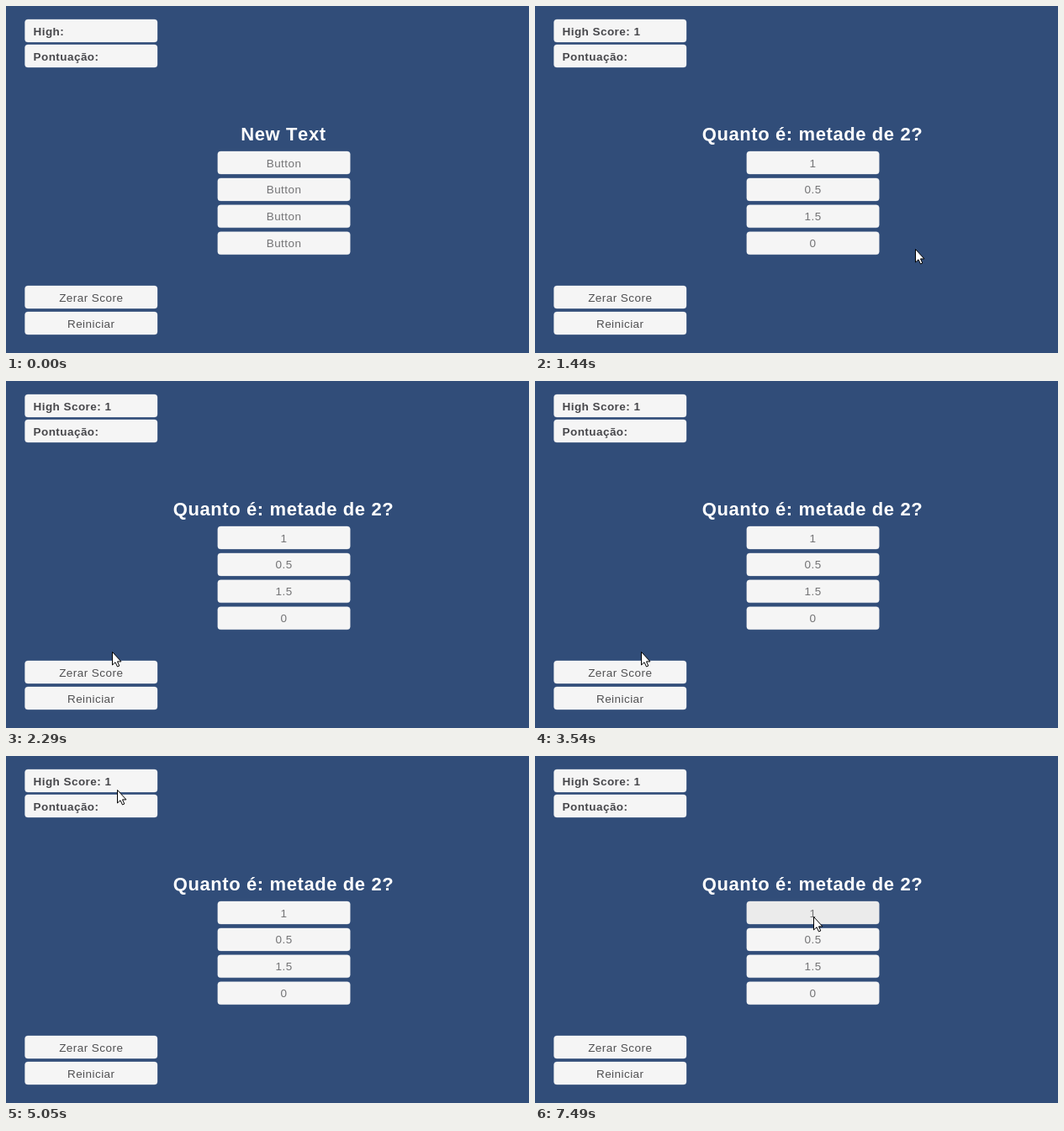
Animation, 622 px wide and 413 px high, one loop 8000 ms. Source, as an HTML page:

```html
<!DOCTYPE html>
<html lang="pt">
<head>
<meta charset="utf-8">
<title>Quiz</title>
<style>
  html, body { margin: 0; width: 100%; height: 100%; overflow: hidden; background: #314d79; }
  svg { display: block; width: 622px; height: 413px; }
  text {
    font: 13.5px "Liberation Sans", Arial, sans-serif;
    font-kerning: none;
    letter-spacing: .45px;
    text-anchor: middle;
    fill: #505052;
  }
  .label { font-weight: bold; text-anchor: start; fill: #47474b; }
  .answer { fill: #747476; }
  .title { font-size: 22px; font-weight: bold; letter-spacing: .6px; fill: #fff; }
  rect { fill: #f5f5f5; stroke: #f5f5f5; stroke-opacity: .3; }
</style>
</head>
<body>
<svg id="stage" viewBox="0 0 622 413"></svg>
<script>
const LOOP = 8000, QUIZ_START = 500, APPEAR = 770, STEP = 70, FADE = 100;
const WIDTH = 157.5, HEIGHT = 27;
const stage = document.getElementById('stage');

function add(tag, attrs, content = '') {
  const el = document.createElementNS('http://www.w3.org/2000/svg', tag);
  for (const key in attrs) el.setAttribute(key, attrs[key]);
  el.textContent = content;
  return stage.appendChild(el);
}

function box(x, y, content, kind) {
  const rect = add('rect', { x, y, width: WIDTH, height: HEIGHT, rx: 3.5 });
  const tx = x + (kind === 'label' ? 10 : WIDTH / 2);
  const text = add('text', { x: tx, y: y + 18.5, class: kind }, content);
  return { x, y, rect, text };
}

const high = box(22.5, 16, 'High:', 'label');
box(22.5, 46, 'Pontuação:', 'label');
const title = add('text', { x: 330, y: 160, class: 'title' });
const values = ['1', '0.5', '1.5', '0'];
const answers = values.map((_, i) => box(251.8, 173 + 31.9 * i, '', 'answer'));
const buttons = [
  ...answers,
  box(22.5, 333, 'Zerar Score', 'action'),
  box(22.5, 364, 'Reiniciar', 'action')
];
const cursor = add('path', {
  d: 'M.5 .5V16L4 12.8 6.5 18 8.8 17 6.5 11.9H11Z',
  fill: '#fff', stroke: '#000', 'stroke-width': 1
});

// Each move is an eased curve from the previous end point to `to`, bent by `via`.
const moves = [
  { start: 740, time: 770, to: [450, 288], via: [500, 302] },
  { start: 1510, time: 420, to: [148, 365], via: [290, 375] },
  { start: 1930, time: 350, to: [126, 322], via: [140, 345] },
  { start: 3530, time: 700, to: [116, 385], via: [229, 288] },
  { start: 4300, time: 70, to: [107, 374], via: [112, 380] },
  { start: 4700, time: 350, to: [132, 40], via: [130, 140] },
  { start: 6720, time: 770, to: [331, 191], via: [140, 95] }
];
moves.forEach((m, i) => { m.from = i ? moves[i - 1].to : [557, 300]; });

const moveAt = t => moves.filter(m => m.start <= t).pop() || moves[0];

function pointer(t) {
  const { start, time, from, via, to } = moveAt(t);
  const k = Math.min(1, Math.max(0, (t - start) / time));
  const u = k * k * (3 - 2 * k), v = 1 - u;
  return from.map((a, i) => a * v * v + 2 * via[i] * u * v + to[i] * u * u);
}

function snap(t) {
  const { start } = moveAt(t);
  return start + Math.floor((t - start) / STEP) * STEP;
}

// Share of the last FADE ms that the pointer spent over the button.
function hover(button, t) {
  const samples = 10;
  let hits = 0;
  for (let i = 0; i < samples; i++) {
    const [x, y] = pointer(t - i * FADE / samples);
    const dx = x - button.x, dy = y - button.y;
    if (dx >= 0 && dx <= WIDTH && dy >= 0 && dy <= HEIGHT) hits++;
  }
  return hits / samples;
}

function draw(t) {
  const playing = t >= QUIZ_START;
  high.text.textContent = playing ? 'High Score: 1' : 'High:';
  title.textContent = playing ? 'Quanto é: metade de 2?' : 'New Text';
  answers.forEach((a, i) => { a.text.textContent = playing ? values[i] : 'Button'; });

  const now = snap(t);
  const [x, y] = pointer(now).map(Math.round);
  cursor.setAttribute('transform', `translate(${x} ${y})`);
  cursor.setAttribute('visibility', t >= APPEAR ? 'visible' : 'hidden');
  for (const b of buttons) {
    const shade = Math.round(245 - 10 * hover(b, now));
    b.rect.style.fill = `rgb(${shade},${shade},${shade})`;
  }
}

const begin = performance.now();
function tick() {
  draw((performance.now() - begin) % LOOP);
  requestAnimationFrame(tick);
}
tick();
</script>
</body>
</html>
```
